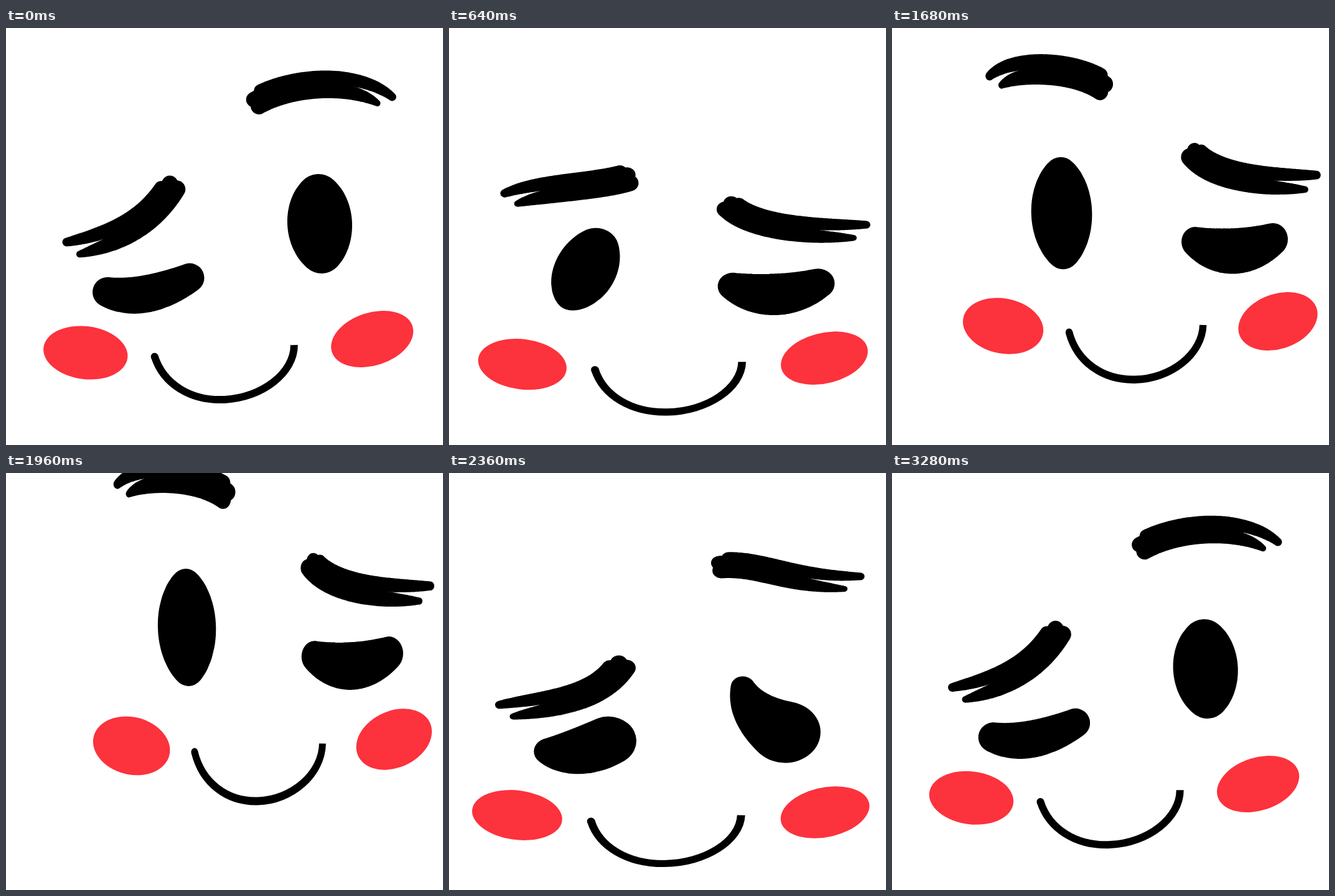
An HTML page with a canvas for the animation above (3.32 s loop, 702 by 671 pixels).

```html
<!DOCTYPE html>
<html lang="en">
<head>
<meta charset="utf-8">
<title>Winking face</title>
<style>
  html, body { margin: 0; width: 100%; height: 100%; overflow: hidden; background: #fff; }
  canvas { display: block; }
</style>
</head>
<body>
<canvas id="stage" width="702" height="671"></canvas>
<script>
const ctx = document.getElementById('stage').getContext('2d');
const LOOP = 3320, STEP = 40;
const INK = '#000', BLUSH = '#fc323d';

// Head poses: x, y, horizontal stretch (vertical is its inverse), tilt
const pose = {
  winkLeft: [358, 511.5, 1, -0.0477],
  droop: [336.5, 567.75, 1.074, -0.0431],
  popUp: [388.5, 498.75, 1.009, -0.0033],
  winkRight: [399.25, 475.75, 0.9577, -0.0156],
  stretch: [412.5, 433.75, 0.915, -0.0209],
  squash: [356.75, 548.25, 1.073, -0.0105]
};

const headTrack = [
  [0, pose.winkLeft],
  [360, pose.droop],
  [460, [328, 586, 1.1, -0.038]],
  [700, [371, 520, 1.035, -0.018]],
  [900, [388, 495, 0.998, -0.006]],
  [1180, [388.3, 504, 1.028, -0.003]],
  [1680, pose.winkRight],
  [1960, pose.stretch],
  [2240, [361, 544.5, 1.067, -0.011]],
  [2360, pose.squash],
  [2560, [379, 491, 0.962, -0.03]],
  [2800, [371, 504, 0.99, -0.045]],
  [3120, [355.5, 513.3, 1.003, -0.0505]]
];

// Stage points seen in a pose, as head coordinates
const inHead = ([px, py, s, tilt], pts) => pts.flatMap(([x, y, ...rest]) => {
  const c = Math.cos(tilt), n = Math.sin(tilt);
  const u = (x - px) / s, v = (y - py) * s;
  return [u * c + v * n, v * c - u * n, ...rest];
});

// An eye is a blob swept through three discs: x, y, radius
const rightEye = {
  open: inHead(pose.winkLeft, [[502, 270, 35], [504, 315, 52], [507, 361, 34]]),
  closing: inHead(pose.droop, [[453, 386, 34], [496, 421, 51], [551, 424, 34]]),
  shut: inHead(pose.winkRight, [[487, 344, 23], [548, 359, 35], [612, 340, 25]]),
  opening: inHead(pose.squash, [[472, 344, 18], [494, 384, 35], [540, 417, 53]])
};
const leftEye = {
  shut: inHead(pose.winkLeft, [[295, 402, 23.5], [224, 428, 30], [163, 425, 24]]),
  slanted: inHead(pose.droop, [[259, 455, 26], [194, 489, 30], [130, 499, 25]]),
  wide: inHead(pose.popUp, [[259, 243, 28], [259, 313, 52.5], [260, 383, 28]]),
  open: inHead(pose.winkRight, [[271, 238, 29], [272.5, 297.5, 51], [275, 358, 29]]),
  half: inHead(pose.squash, [[256, 431, 42], [207, 448, 39], [161, 448, 23]])
};

// A brow is a Bezier spine from its inner to its outer end
const rightBrow = {
  arched: inHead(pose.winkLeft, [[396, 121], [460, 83], [560, 80], [617, 116]]),
  falling: inHead(pose.droop, [[416, 256], [475, 295], [560, 291], [636, 317]]),
  low: inHead(pose.winkRight, [[481, 198], [508, 238], [600, 253], [683, 243]]),
  rising: inHead(pose.squash, [[430, 149], [505, 142], [545, 180], [661, 172]])
};
const leftBrow = {
  low: inHead(pose.winkLeft, [[269, 249], [235, 310], [175, 345], [98, 351]]),
  steep: inHead(pose.droop, [[237, 307], [205, 366], [142, 404], [64, 412]]),
  arched: inHead(pose.winkRight, [[343, 96], [300, 62], [200, 57], [160, 83]]),
  half: inHead(pose.squash, [[279, 304], [245, 363], [165, 374], [82, 379]])
};

// Each brow has three hairs: span on the spine, rise above it and radius at both ends
const hairs = [
  { span: [0.09, 1], rise: [11, 6], radius: [11, 6.5] },
  { span: [0.02, 0.6], rise: [4, 0], radius: [12, 12] },
  { span: [0.03, 0.92], rise: [-9, -14], radius: [13, 5] }
];

const keys = (times, shapes) => times.map((t, i) => [t, shapes[i]]);
const rightTimes = [100, 360, 580, 2140, 2360, 2540];
const leftTimes = [100, 360, 540, 740, 1040, 1320, 2080, 2360, 2560];

const { open, closing, shut, opening } = rightEye;
const rightEyeTrack = keys(rightTimes, [open, closing, shut, shut, opening, open]);

const { arched, falling, low, rising } = rightBrow;
const rightBrowTrack = keys(rightTimes, [arched, falling, low, low, rising, arched]);

const le = leftEye;
const leftEyeTrack = keys(leftTimes,
  [le.shut, le.slanted, le.half, le.wide, le.wide, le.open, le.open, le.half, le.shut]);

const lb = leftBrow;
const leftBrowTrack = keys(leftTimes,
  [lb.low, lb.steep, lb.half, lb.arched, lb.arched, lb.arched, lb.arched, lb.half, lb.low]);

const mix = (a, b, k) => a + (b - a) * k;

// Cyclic cubic interpolation that stays flat at turning points
function sample(track, t) {
  const n = track.length;
  const at = i => {
    const k = track[(i + n) % n];
    return [k[0] + Math.floor(i / n) * LOOP, k[1]];
  };
  let i = n - 1;
  while (i >= 0 && track[i][0] > t) i--;
  const [t0, a] = at(i - 1), [t1, b] = at(i), [t2, c] = at(i + 1), [t3, d] = at(i + 2);
  const h = t2 - t1, u = (t - t1) / h, u2 = u * u, u3 = u2 * u;
  const slope = (l, r) => l * r <= 0 ? 0 : 2 * l * r / (l + r);
  return b.map((p, j) => {
    const q = c[j], mid = (q - p) / h;
    const m1 = slope((p - a[j]) / (t1 - t0), mid) * h;
    const m2 = slope(mid, (d[j] - q) / (t3 - t2)) * h;
    return p * (2 * u3 - 3 * u2 + 1) + m1 * (u3 - 2 * u2 + u) +
      q * (3 * u2 - 2 * u3) + m2 * (u3 - u2);
  });
}

// Fills the area covered by a disc moving along disc(u) = [x, y, r]
function sweep(disc) {
  const n = 100;
  ctx.beginPath();
  for (let i = 0; i <= n; i++) {
    const [x, y, r] = disc(i / n);
    ctx.moveTo(x + r, y);
    ctx.arc(x, y, r, 0, Math.PI * 2);
  }
  ctx.fill();
}

function eye(v) {
  sweep(u => {
    const a = (1 - u) * (1 - 2 * u), b = 4 * u * (1 - u), c = u * (2 * u - 1);
    return [0, 1, 2].map(k => a * v[k] + b * v[k + 3] + c * v[k + 6]);
  });
}

function brow(v, side, weight) {
  const spine = s => {
    const q = 1 - s;
    return [0, 1].map(k => q * q * q * v[k] + 3 * q * q * s * v[k + 2] +
      3 * q * s * s * v[k + 4] + s * s * s * v[k + 6]);
  };
  for (const { span, rise, radius } of hairs) {
    sweep(u => {
      const s = mix(...span, u), taper = u ** 5;
      const [x, y] = spine(s), [x0, y0] = spine(s - 0.01), [x1, y1] = spine(s + 0.01);
      const lift = side * weight * mix(...rise, taper) / Math.hypot(x1 - x0, y1 - y0);
      return [x + (y1 - y0) * lift, y - (x1 - x0) * lift, weight * mix(...radius, taper)];
    });
  }
}

function oval(x, y, rx, ry, angle) {
  ctx.beginPath();
  ctx.ellipse(x, y, rx, ry, angle, 0, Math.PI * 2);
  ctx.fill();
}

function mouth() {
  ctx.lineWidth = 12;
  ctx.strokeStyle = INK;
  ctx.beginPath();
  ctx.moveTo(-120, 11.5);
  ctx.bezierCurveTo(-108, 56, -66, 86, -11, 86);
  ctx.bezierCurveTo(50, 86, 103, 48, 104.8, 3.6);
  ctx.stroke();
  oval(-120, 11.5, 6, 6, 0);
}

function draw(t) {
  ctx.setTransform(1, 0, 0, 1, 0, 0);
  ctx.fillStyle = '#fff';
  ctx.fillRect(0, 0, 702, 671);
  const [x, y, s, tilt] = sample(headTrack, t);
  ctx.translate(x, y);
  ctx.scale(s, 1 / s);
  ctx.rotate(tilt);
  ctx.fillStyle = BLUSH;
  oval(-230.5, 0, 68, 42.5, 0.175);
  oval(230.5, 0, 68, 42.5, -0.262);
  ctx.fillStyle = INK;
  mouth();
  eye(sample(leftEyeTrack, t));
  eye(sample(rightEyeTrack, t));
  brow(sample(leftBrowTrack, t), -1, 1.08);
  brow(sample(rightBrowTrack, t), 1, 1.02);
}

const start = performance.now();
function tick() {
  const t = (performance.now() - start) % LOOP;
  draw(Math.floor(t / STEP) * STEP);
  requestAnimationFrame(tick);
}
tick();
</script>
</body>
</html>
```
